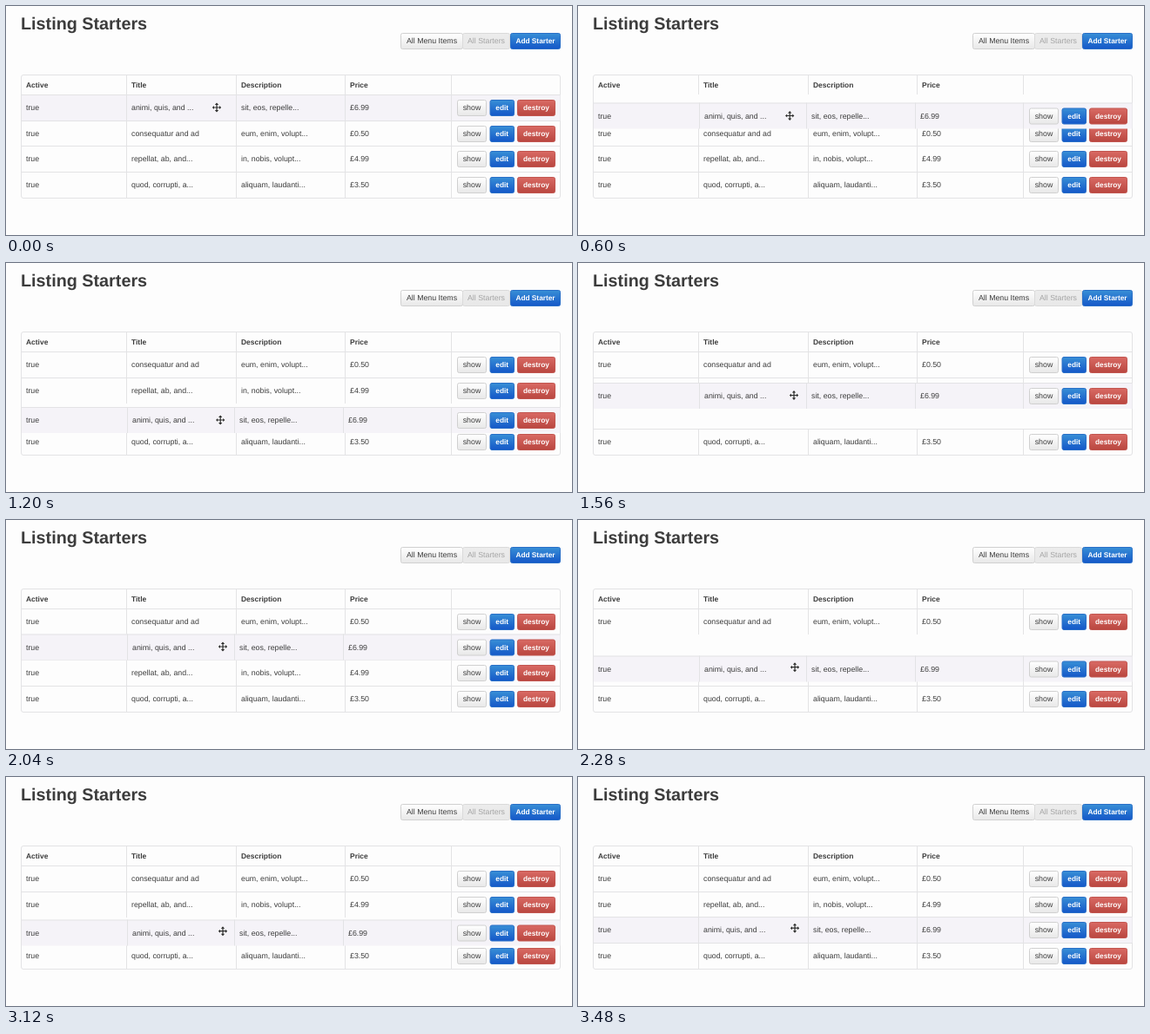
An HTML page that plays this animation: 650x264 px, repeating every 3.6 s.

```html
<!DOCTYPE html>
<html lang="en">
<head>
<meta charset="utf-8">
<title>Sortable table</title>
<style>
  html, body { margin: 0; width: 100%; height: 100%; overflow: hidden; background: #fdfdfd; }
  svg { display: block; }
  text { font: 8.8px "Liberation Sans", Arial, sans-serif; fill: #3c3c3c; text-rendering: geometricPrecision; }
  .title { font-size: 19.8px; font-weight: bold; }
  .head { font-size: 8.45px; font-weight: bold; }
  .label { text-anchor: middle; }
  .blue, .red { font-size: 8.3px; font-weight: bold; fill: #fff; }
  .off { fill: #a4a4a4; }
  .line { fill: none; stroke: #e3e3e5; }
</style>
</head>
<body>
<svg width="650" height="264" viewBox="0 0 650 264">
  <defs id="defs"></defs>
  <g id="page"></g>
  <g id="rows"></g>
  <g id="cursor">
    <path d="M0-5.5 2.2-3H.6V-.6H3V-2L5.2 0 3 2V.6H.6V3H2.2L0 5.5-2.2 3H-.6V.6H-3V2L-5.2 0-3-2V-.6H-.6V-3H-2.2Z"
      fill="#2c2c2c" stroke="#fff" stroke-width=".8" paint-order="stroke"/>
  </g>
</svg>
<script>
const STEP = 120, STEPS = 30, GRAB = 3, DROP = 28;
const LEFT = 17.5, RIGHT = 636.5, TOP = 79.5, BOTTOM = 221.5;
const COLUMNS = [138.5, 264.5, 389.5, 511.5];
const DRAG_COLUMNS = [139.5, 262.5, 387.5, 511.5];

// Border, top and bottom colour of each button style
const STYLES = {
  plain: ['#d0d0d0', '#ffffff', '#e8e8e8'],
  off: ['#dadada', '#ececec', '#e8e8e8'],
  blue: ['#2a70c8', '#388fd6', '#1457c8'],
  red: ['#c25650', '#d96a64', '#b9463f']
};

const ITEMS = [
  ['animi, quis, and ...', 'sit, eos, repelle...', '£6.99'],
  ['consequatur and ad', 'eum, enim, volupt...', '£0.50'],
  ['repellat, ab, and...', 'in, nobis, volupt...', '£4.99'],
  ['quod, corrupti, a...', 'aliquam, laudanti...', '£3.50']
];

// Centre of the carried row at each step between grab and drop
const CARRY = [118, 121, 127, 131, 138, 151, 168, 181.5, 189, 185, 153.5, 139, 129,
  134, 147, 158, 172, 182, 187, 187, 184, 182.5, 181, 180, 178];

const $ = id => document.getElementById(id);
const rowTop = slot => 102 + Math.round(29.7 * slot);
const centre = slot => rowTop(slot) + 15.5;

const text = (x, y, s, cls = '') => `<text x="${x}" y="${y}" class="${cls}">${s}</text>`;
const line = d => `<path class="line" d="${d}"/>`;

function button(x, y, w, h, label, style) {
  return `<rect x="${x + .5}" y="${y + .5}" width="${w - 1}" height="${h - 1}" rx="2"
    fill="url(#${style})" stroke="${STYLES[style][0]}"/>` +
    text(x + w / 2, y + h / 2 + 2.8, label, 'label ' + style);
}

function row(item, y, active, carried) {
  const cols = carried ? DRAG_COLUMNS : COLUMNS;
  const fill = active ? `<rect x="18" width="618.5" height="30" fill="#f5f3f8"/>` : '';
  return `<g transform="translate(0 ${y})">` + fill +
    line(`M${LEFT} .5H${RIGHT}` + cols.map(x => `M${x} 0V30`).join('')) +
    text(23, 18.3, 'true') +
    item.map((s, i) => text(cols[i] + 5.5, 18.3, s)).join('') +
    button(518, 6, 34, 19, 'show', 'plain') +
    button(555.5, 6, 28.5, 19, 'edit', 'blue') +
    button(587, 6, 44, 19, 'destroy', 'red') + '</g>';
}

// A carried row takes a neighbour's slot once it passes that neighbour's centre
let slot = 0;
const slots = CARRY.map(y => {
  if (y > centre(slot + 1)) slot++;
  else if (slot && y < centre(slot - 1)) slot--;
  return slot;
});

function draw(step) {
  const carried = step >= GRAB && step < DROP;
  const gap = carried ? slots[step - GRAB] : step < GRAB ? 0 : 2;
  const y = carried ? CARRY[step - GRAB] : centre(gap);
  const [moving, ...rest] = ITEMS;
  $('rows').innerHTML =
    rest.map((item, i) => row(item, rowTop(i < gap ? i : i + 1))).join('') +
    row(moving, y - 15.5, true, carried);

  const x = Math.min(249, 242 + .6 * Math.max(0, step - GRAB));
  const lag = step < 11 ? .5 : step < 19 ? 1 : 2.3;
  $('cursor').setAttribute('transform', `translate(${x} ${y - lag})`);
}

$('defs').innerHTML = Object.entries(STYLES).map(([id, [, a, b]]) =>
  `<linearGradient id="${id}" x2="0" y2="1"><stop stop-color="${a}"/><stop offset="1" stop-color="${b}"/></linearGradient>`
).join('');

$('page').innerHTML =
  text(17, 27, 'Listing Starters', 'title') +
  button(453, 31, 72, 19, 'All Menu Items', 'plain') +
  button(524, 31, 55, 19, 'All Starters', 'off') +
  button(579, 31, 58, 19, 'Add Starter', 'blue') +
  `<rect class="line" x="${LEFT}" y="${TOP}" width="${RIGHT - LEFT}" height="${BOTTOM - TOP}" rx="2.5"/>` +
  line(COLUMNS.map(x => `M${x} ${TOP}V102`).join('')) +
  ['Active', 'Title', 'Description', 'Price'].map((s, i) =>
    text(i ? COLUMNS[i - 1] + 5.5 : 23, 94.3, s, 'head')).join('');

let shown = -1;
const start = performance.now();
function tick() {
  const step = Math.floor((performance.now() - start) / STEP) % STEPS;
  if (step !== shown) draw(shown = step);
  requestAnimationFrame(tick);
}
tick();
</script>
</body>
</html>
```
